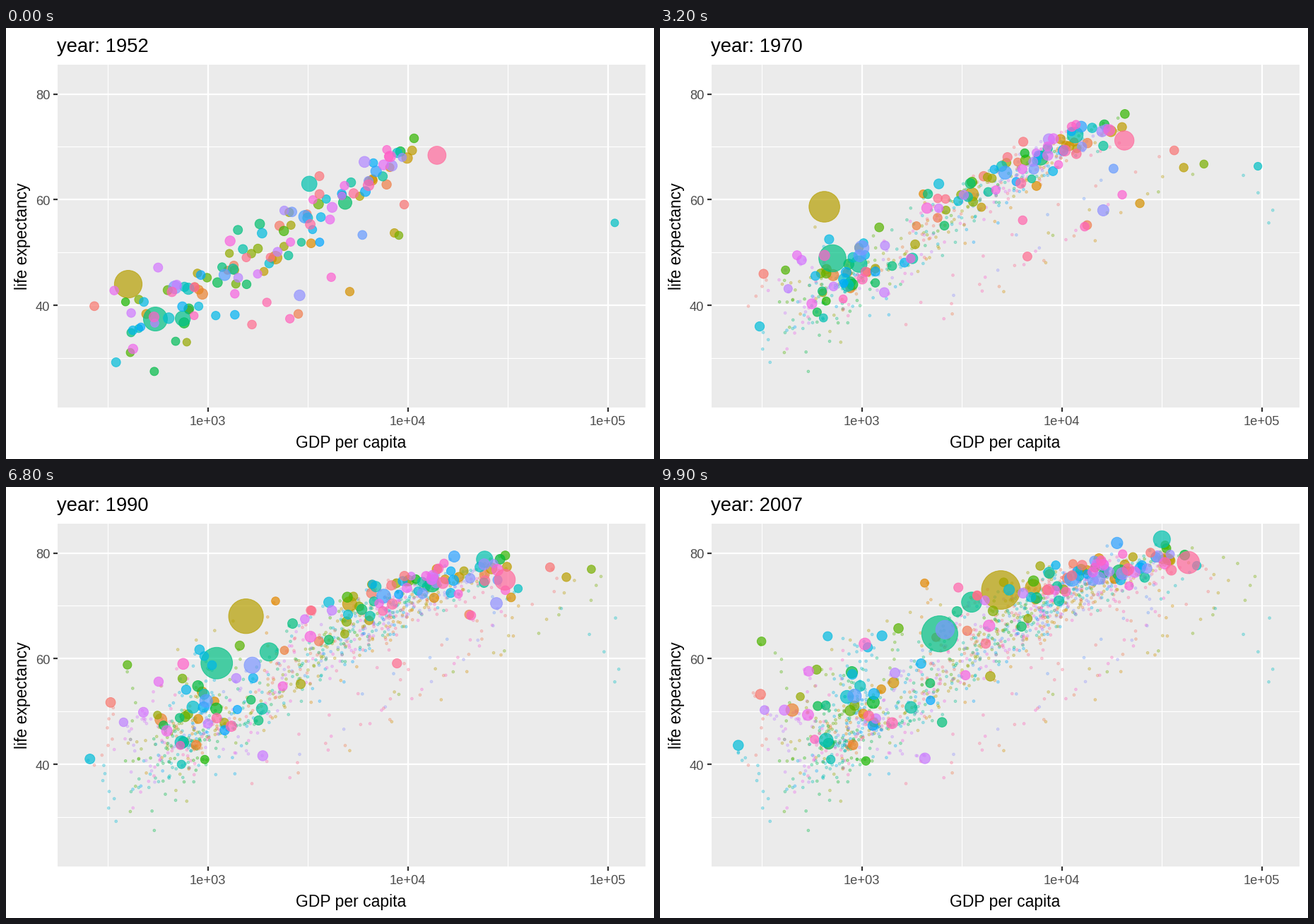
Recreate the animation shown at these times as a matplotlib script. Size 917 px wide and 611 px high, loop 10000 ms.

```python
import numpy as np
import matplotlib.pyplot as plt
from matplotlib.animation import FuncAnimation

W, H, DPI = 917, 611, 150
LEFT, RIGHT, TOP, BOTTOM = 73, 905, 52, 538
FRAMES, STEP, N = 100, 9, 142
YEARS = np.arange(1952, 2008, 5)
XLIM = np.log10([241.166, 113523.13])
YLIM = np.array([23.599, 82.603])
POP_MAX = 1319
STROKE = 0.48

plt.rcParams["font.family"] = "Liberation Sans"

# colour slot: population in millions at both ends, (year, GDP, life) points
LEADERS = {
    25: (556, 1319, [(1952, 400, 44), (1962, 488, 44.5), (1970, 650, 61),
                     (1990, 1520, 68.2), (2007, 4959, 73)]),
    59: (372, 1110, [(1952, 547, 37.4), (1970, 710, 49.2),
                     (1990, 1080, 59.5), (2007, 2452, 64.7)]),
    60: (82, 223, [(1952, 750, 37.5), (1970, 940, 47.8),
                   (1990, 2060, 61.6), (2007, 3541, 70.7)]),
    67: (86, 127, [(1952, 3217, 63), (1970, 12400, 72.6),
                   (1990, 25000, 79), (2007, 31656, 82.6)]),
    72: (0.2, 2.5, [(1952, 108382, 55.6), (1957, 113523, 58),
                    (1967, 80895, 64.6), (1972, 109348, 67.7),
                    (1982, 31354, 71.3), (2007, 47307, 77.6)]),
    98: (41, 169, [(1952, 685, 43.4), (1970, 1000, 51), (2007, 2606, 65.5)]),
    135: (157, 301, [(1952, 13990, 68.4), (1970, 20700, 71.2),
                     (2007, 42952, 78.2)]),
}


def hcl(hue, chroma=100, lum=65):
    """Polar LUV to sRGB, clipped to the gamut."""
    h = np.radians(hue)
    y = ((lum + 16) / 116) ** 3
    u = chroma * np.cos(h) / (13 * lum) + 0.1978
    v = chroma * np.sin(h) / (13 * lum) + 0.4683
    x = 9 * y * u / (4 * v)
    z = y * (12 - 3 * u - 20 * v) / (4 * v)
    lin = np.array([3.2406 * x - 1.5372 * y - 0.4986 * z,
                    -0.9689 * x + 1.8758 * y + 0.0415 * z,
                    0.0557 * x - 0.2040 * y + 1.0570 * z]).clip(0, 1)
    return np.where(lin > 0.0031308, 1.055 * lin ** (1 / 2.4) - 0.055,
                    12.92 * lin)


def build():
    """Log GDP, life expectancy and dot size per five-year step and slot."""
    rng = np.random.default_rng(7)
    t = np.linspace(0, 1, len(YEARS))[:, None]
    wealth = rng.permutation((np.arange(N) + 0.5) / N)
    noise = rng.standard_normal((7, N))
    oil = rng.random(N) < 0.06
    # only countries above a threshold of wealth take off
    takeoff = 1 / (1 + np.exp((0.38 - wealth) / 0.04))

    start = 2.58 + 1.45 * wealth + 0.1 * noise[0] * (1 - wealth)
    rise = 0.15 + 0.38 * takeoff + (0.26 - 0.17 * wealth) * noise[1]
    bulge = 0.05 + 0.06 * noise[2] + 0.5 * oil
    x = start + rise * t ** 0.85 + bulge * np.sin(np.pi * t)

    born = 36 + 34 * wealth ** 1.15 + (4.8 - 3 * wealth) * noise[3] - 14 * oil
    late = 53 + takeoff * (14 + 13 * wealth) + (6 - 4.5 * takeoff) * noise[4]
    y = born + (late - born) * (1 - (1 - t) ** 1.7)

    x += 0.02 * rng.standard_normal(x.shape)
    y += 0.3 * rng.standard_normal(y.shape)
    last = np.exp(2 + noise[5]).clip(0.3, 85)
    pop = last * (3 - 1.7 * wealth) ** (t - 1)

    for slot, (first, final, points) in LEADERS.items():
        i = slot - 1
        year, gdp, life = np.transpose(points)
        x[:, i] = np.interp(YEARS, year, np.log10(gdp))
        y[:, i] = np.interp(YEARS, year, life)
        pop[:, i] = np.geomspace(first, final, len(YEARS))
    return x.clip(*XLIM), y.clip(*YLIM), 2 + 10 * np.sqrt(pop / POP_MAX)


def area(size):
    return (0.75 * (size * 2.845 + 0.945)) ** 2


X, Y, SIZE = build()
RGB = np.array([hcl(15 + 360 * i / N) for i in range(N)])


def rgba(alpha):
    return np.column_stack([RGB, np.full(N, alpha)])


fig = plt.figure(figsize=(W / DPI, H / DPI), dpi=DPI, facecolor="white")
ax = fig.add_axes([LEFT / W, 1 - BOTTOM / H,
                   (RIGHT - LEFT) / W, (BOTTOM - TOP) / H])
ax.set_facecolor("#EBEBEB")
pad = np.array([-0.05, 0.05])
ax.set_xlim(XLIM + pad * np.ptp(XLIM))
ax.set_ylim(YLIM + pad * np.ptp(YLIM))
for spine in ax.spines.values():
    spine.set_visible(False)
ax.set_xticks([3, 4, 5], labels=[])
ax.set_yticks([40, 60, 80], labels=[])
ax.tick_params(length=2.75, width=1.07, color="#333333")
for draw, minor, major in ((ax.axvline, (2.5, 3.5, 4.5), (3, 4, 5)),
                           (ax.axhline, (30, 50, 70), (40, 60, 80))):
    for v in minor:
        draw(v, color="white", lw=0.53, zorder=0)
    for v in major:
        draw(v, color="white", lw=1.07, zorder=0.5)


def label(x, y, text, size, color="black", **kw):
    return fig.text(x / W, 1 - y / H, text, fontsize=size, color=color,
                    **{"va": "baseline", **kw})


def to_px(v, limits, a, b):
    lo, hi = limits
    return a + (v - lo) / (hi - lo) * (b - a)


for v in (3, 4, 5):
    label(to_px(v, ax.get_xlim(), LEFT, RIGHT), 563, f"1e+0{v}", 8.8,
          "#4D4D4D", ha="center")
for v in (40, 60, 80):
    label(62.5, to_px(v, ax.get_ylim(), BOTTOM, TOP) + 7.5, str(v), 8.8,
          "#4D4D4D", ha="right")
label(488.5, 595, "GDP per capita", 11, ha="center")
label(35, 295, "life expectancy", 11, rotation=90, ha="right", va="center")
title = label(72.5, 34.5, "", 13.2)

trail = ax.scatter([], [], s=area(0.5), linewidths=STROKE, zorder=2)
dots = ax.scatter(X[0], Y[0], s=area(SIZE[0]), c=rgba(0.7),
                  edgecolors=rgba(0.7), linewidths=STROKE, zorder=3)


def update(i):
    k = min(i // STEP, len(YEARS) - 2)
    t = i / STEP - k

    def mix(a):
        return a[k] + (a[k + 1] - a[k]) * t

    dots.set_offsets(np.column_stack([mix(X), mix(Y)]))
    dots.set_sizes(area(mix(SIZE)))
    past = -(-i // STEP)  # steps already left behind
    trail.set_offsets(np.column_stack([X[:past].ravel(), Y[:past].ravel()]))
    faint = np.tile(rgba(0.3), (past, 1))
    trail.set_facecolor(faint)
    trail.set_edgecolor(faint)
    title.set_text(f"year: {round(1952 + 55 * i / (FRAMES - 1))}")
    return dots, trail, title


anim = FuncAnimation(fig, update, frames=FRAMES, interval=100, repeat=True,
                     repeat_delay=0, init_func=lambda: update(0))
plt.show()
```
